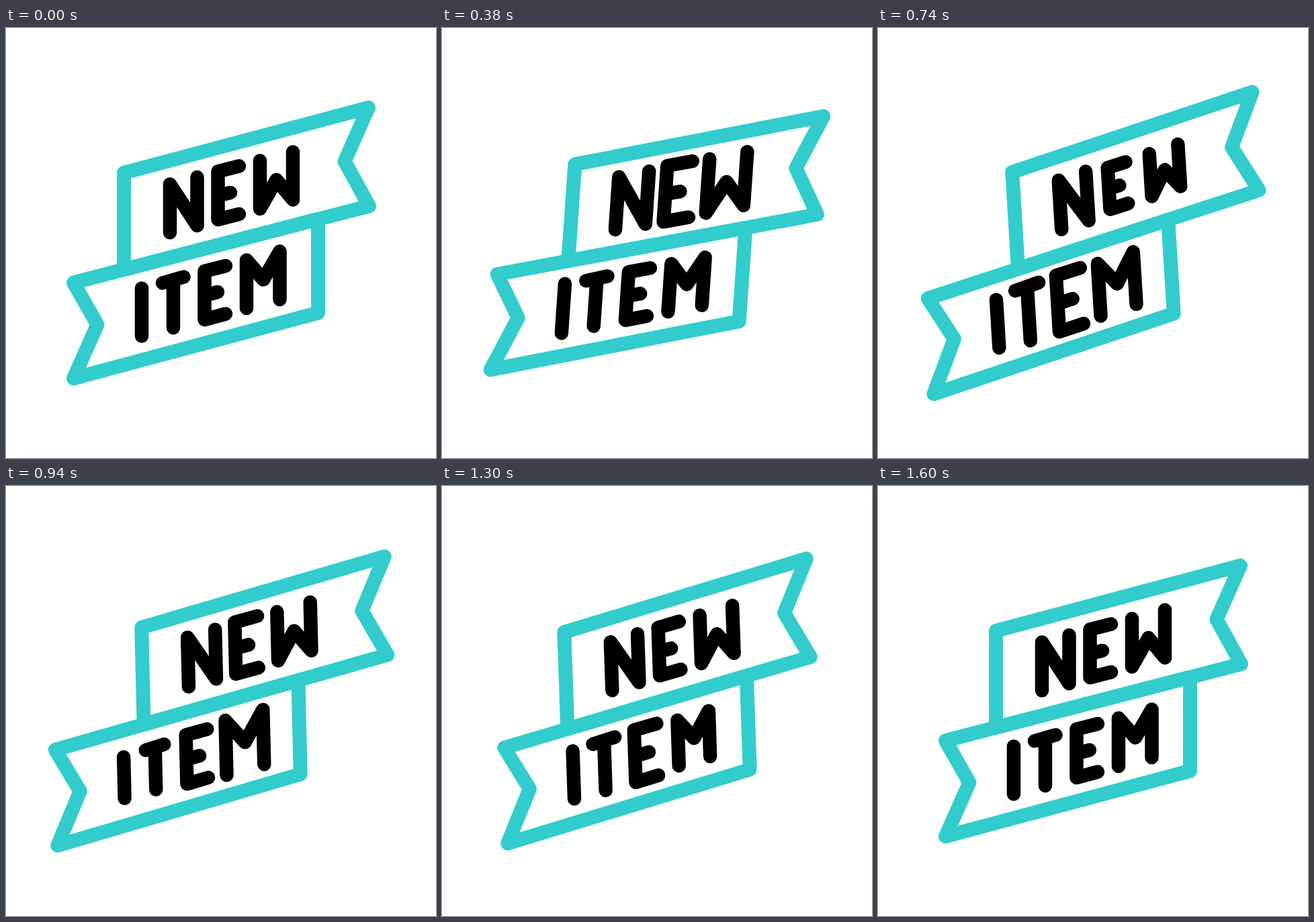
Recreate the animation shown at these times as an HTML page. Size 640 by 640 pixels, loop 1800 ms.

```html
<!DOCTYPE html>
<html lang="en">
<head>
<meta charset="utf-8">
<title>New item ribbon</title>
<style>
  html, body { margin: 0; width: 100%; height: 100%; overflow: hidden; background: #fff; }
  svg { display: block; width: 100%; height: 100%; }
  path { fill: none; stroke: #000; stroke-linecap: round; stroke-linejoin: round; }
  .ribbon { stroke: #3cc; stroke-width: 21; }
  .letter { transform-box: fill-box; transform-origin: center; }
</style>
</head>
<body>
<svg viewBox="0 0 640 640" role="img" aria-label="New item">
  <g id="sign">
    <g id="upper">
      <path class="ribbon" d="M175.5 215.5L539.5 118.5L504 198.5L540.5 265L175.5 359.5Z"/>
      <path class="letter" d="M244 304.5V232.5L284.5 294V222"/>
      <path class="letter" d="M347 205.5L315.5 213.5V285L347 277M315.5 249.5L334 245"/>
      <path class="letter" d="M378 197.5V269L402.5 226L427 255.5V184.5"/>
    </g>
    <g id="lower">
      <path class="ribbon" d="M464.5 424L100.5 521.5L136 441.5L100.5 379L464.5 284.5Z"/>
      <path class="letter" d="M202 387.5V458.5"/>
      <path class="letter" d="M233 379.5L264.5 370.5M249 375V446"/>
      <path class="letter" d="M327 354L295.5 362V434L327 425.5M295.5 398L315 393"/>
      <path class="letter" d="M358 417V345.5L383 374.5L407.5 332.5V404"/>
    </g>
  </g>
</svg>
<script>
  const LOOP = 1800, STEP = 20, STAGGER = 100, LETTER_WEIGHT = 20.5;

  // Keys are [time in ms, value]
  const SWING = [[0, 0], [400, 4], [800, -4], [1105, 2], [1310, -2], [1600, 0]];
  const SLIDE = [[0, 0], [800, 32.5], [1600, 0]];
  const PULSE = [[0, 1], [270, 1.17], [610, 0.85], [810, 1.08], [1000, 1]];

  const [sign, upper, lower] = ["sign", "upper", "lower"].map(id => document.getElementById(id));
  const letters = document.querySelectorAll(".letter");

  function valueAt(keys, t) {
    if (t <= keys[0][0]) return keys[0][1];
    const i = keys.findIndex(key => key[0] > t);
    if (i < 0) return keys[keys.length - 1][1];
    const [t0, a] = keys[i - 1], [t1, b] = keys[i];
    const u = (t - t0) / (t1 - t0);
    return a + (b - a) * u * u * (3 - 2 * u);
  }

  function slide(half, distance) {
    half.setAttribute("transform", `translate(${distance * 0.966} ${distance * -0.258})`);
  }

  function draw(now) {
    const t = Math.floor(now % LOOP / STEP) * STEP;
    const offset = valueAt(SLIDE, t);
    sign.setAttribute("transform", `rotate(${valueAt(SWING, t)} 320 320)`);
    slide(upper, offset);
    slide(lower, -offset);
    letters.forEach((letter, i) => {
      const scale = valueAt(PULSE, t - i * STAGGER);
      letter.style.transform = `scale(${scale})`;
      letter.style.strokeWidth = LETTER_WEIGHT / scale; // the pen weight stays constant
    });
  }

  const start = performance.now();
  function tick() {
    draw(performance.now() - start);
    requestAnimationFrame(tick);
  }
  tick();
</script>
</body>
</html>
```
